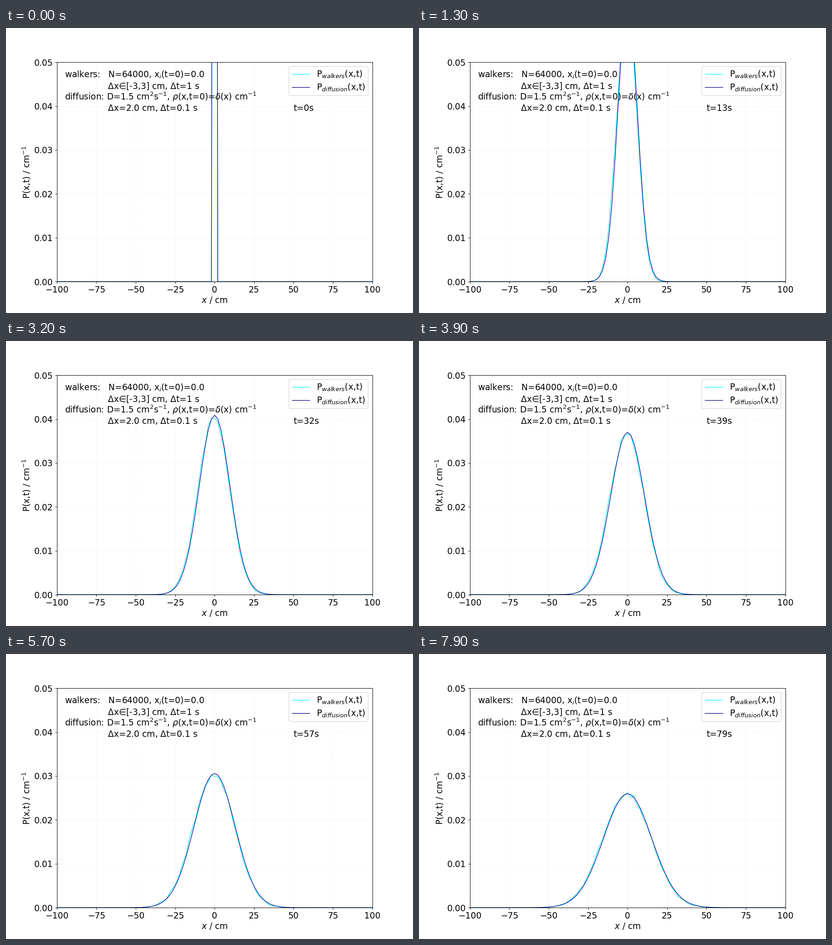
A matplotlib script that plays this animation: 894x626 px, repeating every 8 s.

```python
import matplotlib.pyplot as plt
import numpy as np
from matplotlib.animation import FuncAnimation

DPI = 89.4
SIZE = (894.01 / DPI, 626.01 / DPI)
FRAMES, INTERVAL = 80, 100

D, DX, DT = 1.5, 2.0, 0.1
WALKERS, STEP = 64000, 3
x = np.arange(-100, 101, DX)


def diffusion_profiles():
    """Explicit finite differences, one profile per second."""
    p = np.where(x == 0, 1 / DX, 0.0)
    r = D * DT / DX**2
    profiles = []
    for _ in range(FRAMES):
        profiles.append(p.copy())
        for _ in range(round(1 / DT)):
            p[1:-1] += r * (p[2:] - 2 * p[1:-1] + p[:-2])
    return profiles


def walker_profiles():
    """Normalised histograms of independent random walkers."""
    rng = np.random.default_rng(7)
    pos = np.zeros(WALKERS)
    edges = np.append(x, x[-1] + DX) - 0.5
    profiles = []
    for _ in range(FRAMES):
        profiles.append(np.histogram(pos, edges)[0] / (WALKERS * DX))
        pos += rng.uniform(-STEP, STEP, WALKERS)
    return profiles


diffusion = diffusion_profiles()
walkers = walker_profiles()

plt.rcParams.update({"font.family": "DejaVu Sans", "font.size": 15})
fig, ax = plt.subplots(figsize=SIZE, dpi=DPI)
ax.set_xlim(-100, 100)
ax.set_ylim(0, 0.05)
ax.set_xlabel("$x$ / cm", labelpad=2.5)
ax.set_ylabel("P(x,t) / cm$^{-1}$")
ax.grid(linestyle=":", alpha=0.3)

walk_line, = ax.plot(x, walkers[0], color="cyan", lw=1,
                     label="P$_{walkers}$(x,t)")
diff_line, = ax.plot(x, diffusion[0], color="darkblue", lw=1,
                     label="P$_{diffusion}$(x,t)")
ax.legend(loc="upper right", borderpad=0.35, labelspacing=0.33,
          handlelength=2.1)

indent = " " * 16
notes = [
    "walkers:   N=64000, x$_i$(t=0)=0.0",
    indent + r"$\Delta$x∈[-3,3] cm, $\Delta$t=1 s",
    "diffusion: D=1.5 cm$^2$s$^{-1}$, "
    r"$\rho$(x,t=0)=$\delta$(x) cm$^{-1}$",
    indent + r"$\Delta$x=2.0 cm, $\Delta$t=0.1 s",
]
rows = np.linspace(0.0465, 0.0389, len(notes))
for y, note in zip(rows, notes):
    ax.text(-95, y, note)
clock = ax.text(50, rows[-1], "t=0s")


def update(t):
    walk_line.set_ydata(walkers[t])
    diff_line.set_ydata(diffusion[t])
    clock.set_text(f"t={t}s")
    return walk_line, diff_line, clock


anim = FuncAnimation(fig, update, frames=FRAMES, interval=INTERVAL,
                     repeat=True, repeat_delay=0)
plt.show()
```
